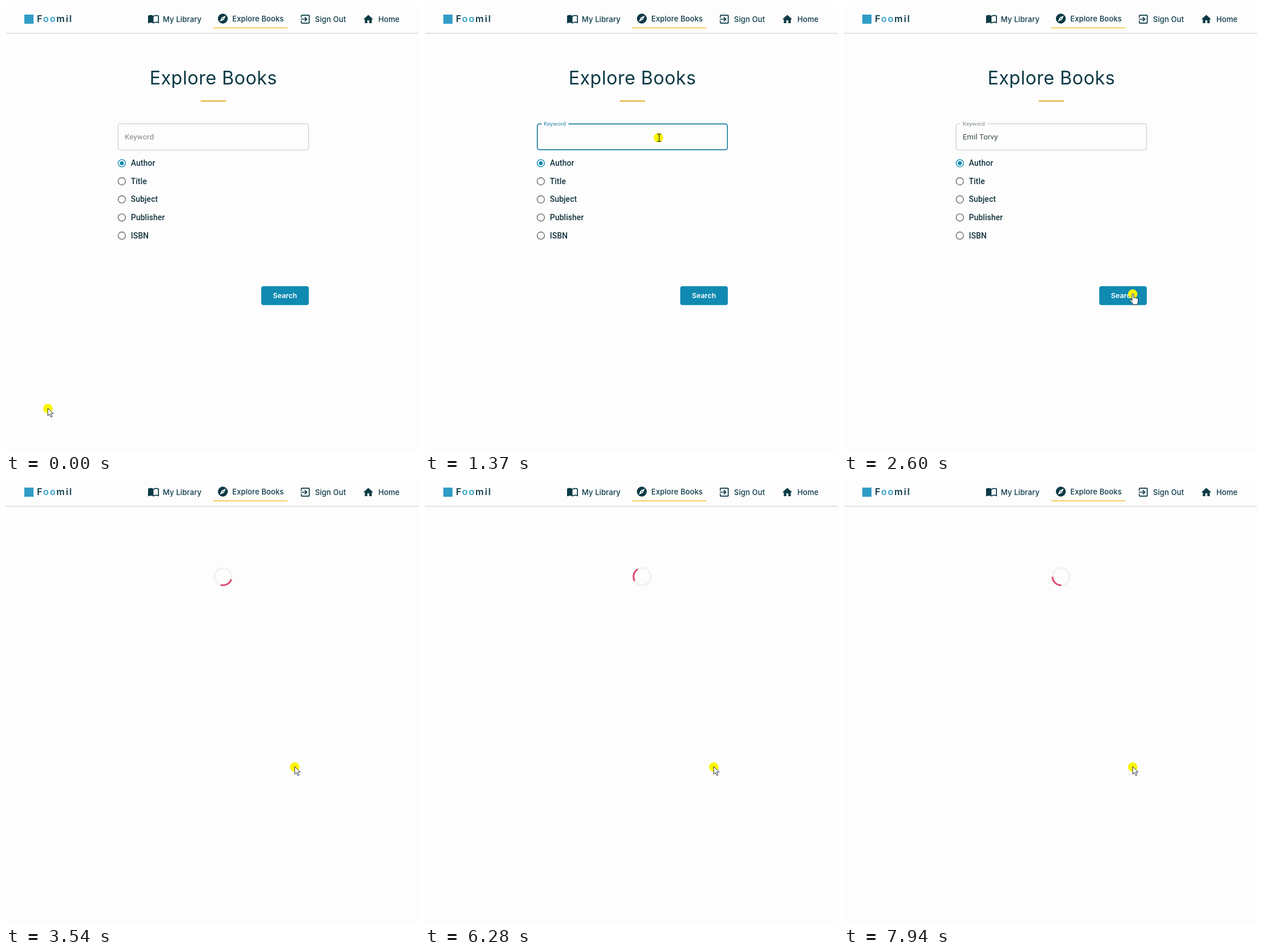
An HTML page for the animation above (7990 ms loop, 721 by 777 pixels).

```html
<!DOCTYPE html>
<html lang="en">
<head>
<meta charset="utf-8">
<title>Explore Books</title>
<style>
  html, body { margin: 0; width: 100%; height: 100%; overflow: hidden; background: #fdfdfe; }
  svg { display: block; width: 100vw; height: 100vh; }
  text { font-family: Roboto, sans-serif; fill: #0b3a45; }
  .head { font-family: Inter, sans-serif; text-anchor: middle; }
  .nav { font-size: 13px; font-weight: 500; letter-spacing: .1px; }
  .title { font-size: 32px; font-weight: 400; letter-spacing: .5px; }
  .brand { font: 600 16px Inter, sans-serif; letter-spacing: 1.9px; }
  .option { font-size: 13.8px; font-weight: 500; letter-spacing: .1px; fill: #12333c; }
  .field { font-size: 13.1px; letter-spacing: .12px; }
  .icon { fill: #0b3a45; }
</style>
</head>
<body>
<svg viewBox="0 0 721 777" preserveAspectRatio="none">
  <rect width="721" height="777" fill="#fdfdfe"/>

  <g id="bar">
    <rect x="32" y="15" width="16" height="16" fill="#2f9dc6"/>
    <text class="brand" x="54" y="28">F<tspan fill="#2f9dc6">oo</tspan>mil</text>
    <rect x="362" y="37" width="129.500" height="2.300" fill="#f6d373"/>
    <rect y="47" width="721" height="1" fill="#cbccc2"/>
  </g>

  <g id="form">
    <text class="head title" x="362" y="136.500">Explore Books</text>
    <rect x="340" y="164.700" width="44" height="2.500" fill="#efb443"/>
    <rect id="box" fill="none"/>
    <rect id="notch" x="203.500" y="203" width="47" height="5" fill="#fdfdfe"/>
    <text id="label" class="field">Keyword</text>
    <text id="value" class="field" x="207.300" y="233" style="fill:#38474b"></text>
    <rect id="caret" y="220.500" width="1" height="16" fill="#12333c"/>
    <g id="options"></g>
    <rect x="445.500" y="489.200" width="83.200" height="33" rx="4" fill="#108ab1"/>
    <text class="head" x="487" y="510.200" style="fill:#fff;font-size:12.4px;font-weight:600">Search</text>
  </g>

  <g id="loader" fill="none" stroke-width="3">
    <circle cx="379" cy="170.500" r="15" stroke="#f1f1ee"/>
    <path id="arc" d="M368.390 159.890A15 15 0 0 1 389.610 159.890" stroke="#e0486f"/>
  </g>

  <g id="pointer">
    <circle r="8.200" fill="#fbf500"/>
    <g stroke="#20252b" stroke-linejoin="round">
      <path id="arrow" transform="translate(0 -1)" fill="#fff" stroke-width=".95"
        d="M0 0V13.500L3.100 10.700L5.300 15.900L7.600 14.900L5.400 9.700H9.500Z"/>
      <path id="beam" transform="translate(1.300 0)" fill="none" stroke-width="1.200"
        d="M-3.500-6.500H-1L0-5.700L1-6.500H3.500M0-5.700V5.700M-3.500 6.500H-1L0 5.700L1 6.500H3.500"/>
      <path id="hand" transform="translate(.5 -1)" fill="#fff" stroke-width="1"
        d="M-1.600 12.600V1.600a1.500 1.500 0 0 1 3 0V7.500q1.500-.9 2.800.3q1.600-.6 2.600.5q2.200-.2 2.200 1.800V14q0 2.200-1.400 3.600V19.500H0V18L-5 12.400q-1-1.600.6-2.200q1.200-.2 2.800 2.400Z"/>
    </g>
  </g>
</svg>

<script>
const LOOP = 7990, FOCUS = 1020, BLUR = 2480, LOAD = 2730;
const NAME = 'Emil Torvy';
const NS = 'http://www.w3.org/2000/svg';
const $ = id => document.getElementById(id);

function add(parent, tag, attrs, text) {
  const el = document.createElementNS(NS, tag);
  for (const key in attrs) el.setAttribute(key, attrs[key]);
  if (text) el.textContent = text;
  parent.append(el);
}

function set(id, attrs) {
  for (const key in attrs) $(id).setAttribute(key, attrs[key]);
}

const show = (id, on) => { $(id).style.display = on ? '' : 'none'; };

// label, text centre, baseline, icon centre x and y, icon shape on a 24 unit grid
const links = [
  ['My Library', 307.5, 27.7, 257.5, 22.3, 'M21 5c-1.11-.35-2.33-.5-3.5-.5-1.95 0-4.05.4-5.5 1.5-1.45-1.1-3.55-1.5-5.5-1.5S2.45 4.9 1 6v15.1C3.1 20.4 5 20 6.500 20c1.950 0 4.050.4 5.500 1.500 1.350-.85 3.800-1.500 5.500-1.500 1.650 0 3.350.3 5.500 1.100V6c-.6-.45-1.250-.75-2-1zm0 13.500c-1.100-.35-2.300-.5-3.500-.5-1.700 0-4.150.65-5.500 1.500V8c1.350-.85 3.800-1.500 5.500-1.500 1.200 0 2.400.15 3.500.5z'],
  ['Explore Books', 440, 27, 378.5, 22, 'M12 10.900a1.100 1.100 0 1 0 0 2.200a1.100 1.100 0 1 0 0-2.200zM12 2a10 10 0 1 0 0 20a10 10 0 1 0 0-20zm2.190 12.190L6 18l3.810-8.190L18 6z'],
  ['Sign Out', 566.5, 27.7, 522.5, 23, 'M10.100 15.600L11.500 17l5-5-5-5-1.400 1.400L12.700 11H3v2h9.700zM19 3H5q-2 0-2 2v4h2V5h14v14H5v-4H3v4q0 2 2 2h14q2 0 2-2V5q0-2-2-2z'],
  ['Home', 668.5, 27.7, 632.5, 23.2, 'M10 20v-6h4v6h5v-8h3L12 3 2 12h3v8z']
];
for (const [name, x, y, ix, iy, d] of links) {
  add($('bar'), 'text', { class: 'head nav', x, y }, name);
  add($('bar'), 'path', {
    class: 'icon', d, 'fill-rule': 'evenodd',
    transform: `translate(${ix} ${iy}) scale(.865) translate(-12 -12)`
  });
}

['Author', 'Title', 'Subject', 'Publisher', 'ISBN'].forEach((name, i) => {
  const cy = 274.5 + 31.6 * i, on = i === 0, color = on ? '#118ab2' : '#6c6d69';
  add($('options'), 'circle', { cx: 202.2, cy, r: 6.4, fill: 'none', stroke: color, 'stroke-width': 1.4 });
  if (on) add($('options'), 'circle', { cx: 202.2, cy, r: 3.5, fill: color });
  add($('options'), 'text', { class: 'option', x: 218, y: cy + 4.6 }, name);
});

// time, x, y
const path = [
  [0, 73, 703], [90, 73, 703], [500, 108, 560], [900, 194, 327],
  [950, 300, 268], [1020, 407.5, 230], [1710, 407.5, 230],
  [1850, 414, 300], [2010, 436, 480], [2120, 456, 548],
  [2200, 482, 540], [2310, 504, 503], [LOOP, 504, 503]
];

function pointerAt(t) {
  const i = Math.max(1, path.findIndex(p => p[0] > t));
  const [t0, x0, y0] = path[i - 1], [t1, x1, y1] = path[i];
  const k = (t - t0) / (t1 - t0);
  return [x0 + (x1 - x0) * k, y0 + (y1 - y0) * k];
}

const within = (x, y, l, t, r, b) => x > l && x < r && y > t && y < b;

function drawField(t) {
  const focused = t >= FOCUS && t < BLUR;
  const k = Math.min(1, Math.max(0, (t - FOCUS) / 50));
  const w = focused ? 1.7 : 1;
  set('box', {
    x: 195.3 + w / 2, y: 205.1 + w / 2, width: 333.4 - w, height: 46.7 - w, rx: 3.5,
    stroke: focused ? '#20829c' : '#c5c5bb', 'stroke-width': w
  });
  show('notch', k > 0);
  set('label', { transform: `translate(207.300 ${233 - 24 * k}) scale(${1 - .24 * k})` });
  $('label').style.fill = focused ? '#2f87a2' : k ? '#7d898d' : '#878983';

  const typed = t < 1410 ? 0 : t < 1450 ? 3 : t < 1490 ? 7 : NAME.length;
  $('value').textContent = NAME.slice(0, typed);
  const blink = t >= 1410 && t < 1750;
  show('caret', blink);
  if (blink) set('caret', { x: 207.8 + $('value').getComputedTextLength() });
}

function draw(t) {
  const loading = t >= LOAD;
  show('form', !loading);
  show('loader', loading);
  if (loading) set('arc', { transform: `rotate(${(t - 2695) * .18} 379 170.500)` });
  else drawField(t);

  const [x, y] = pointerAt(t);
  const beam = !loading && within(x, y, 195, 205, 529, 252);
  const hand = !loading && within(x, y, 445, 489, 529, 522);
  set('pointer', { transform: `translate(${x} ${y})` });
  show('beam', beam);
  show('hand', hand);
  show('arrow', !beam && !hand);
}

const start = performance.now();
function tick() {
  draw((performance.now() - start) % LOOP);
  requestAnimationFrame(tick);
}
tick();
</script>
</body>
</html>
```
